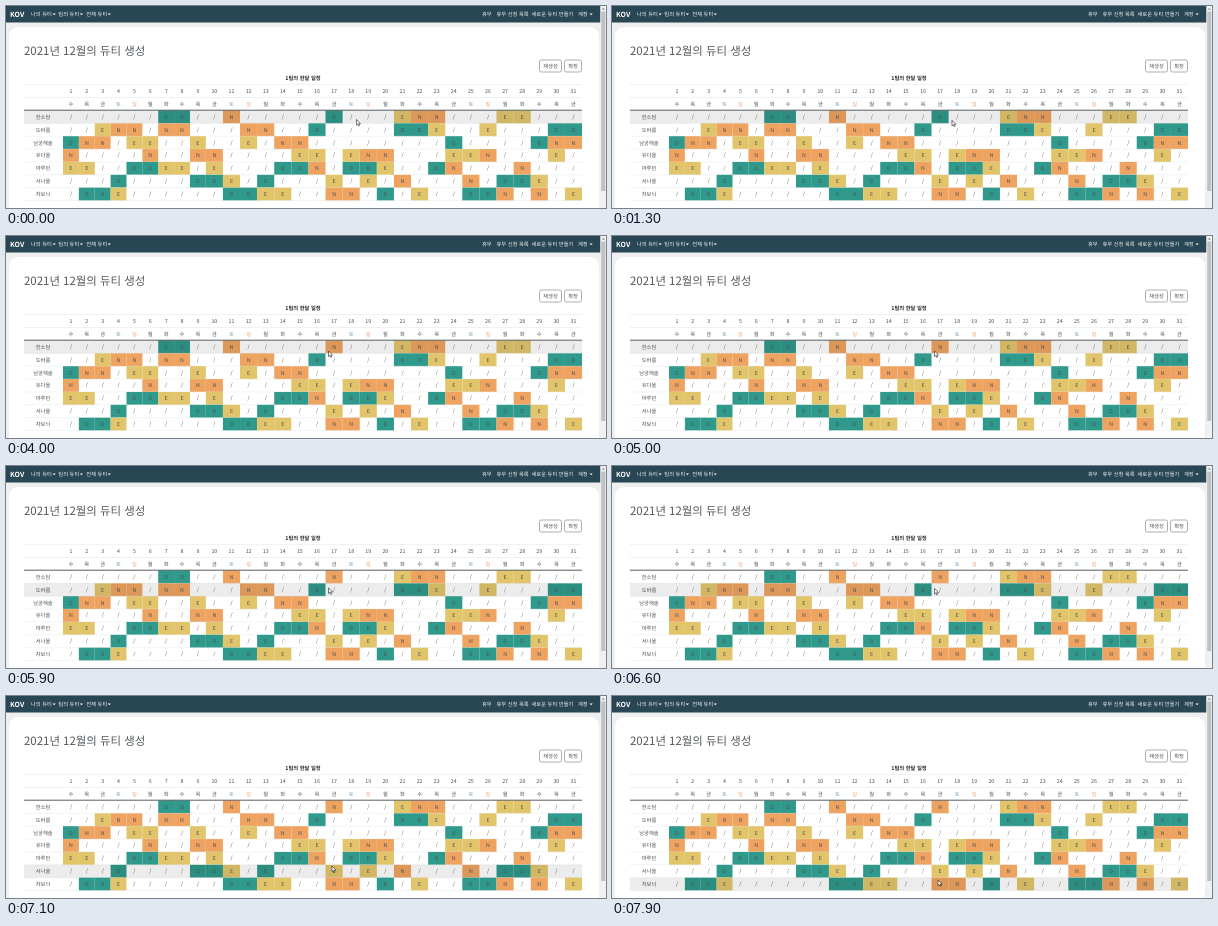
Write an HTML page that moves like this. It is 600x202 px and loops after 8000 ms.

```html
<!DOCTYPE html>
<html lang="ko">
<head>
<meta charset="utf-8">
<style>
html, body { margin: 0; width: 100%; height: 100%; overflow: hidden; background: #efefef; }
svg { display: block; width: 600px; height: 202px; }
text {
  font: 5.3px "Noto Sans CJK KR", "Noto Sans CJK", "Noto Sans", sans-serif;
  fill: #4c5155;
  text-rendering: geometricPrecision;
}
.nav { fill: #f4f6f7; }
.bold { font-weight: 700; fill: #212529; }
.brand { font-size: 7px; font-weight: 900; fill: #fff; }
.title { font-size: 11.45px; font-weight: 300; fill: #54595d; }
.sat { fill: #7da3bb; }
.sun { fill: #eaa173; }
</style>
</head>
<body>
<svg id="stage" viewBox="0 0 600 202"></svg>
<script>
const LOOP = 8000, STEP = 100;
const TOP = 104.5, ROW = 12.86, LEFT = 18, RIGHT = 576;
const COLORS = { D: '#2f998b', E: '#e2c56b', N: '#efa360', '/': 'none' };
const ROSTER = [
  ['한소담', '//////DD//N/////D///ENN///EE///'],
  ['도바름', '//ENN/NN///NN//D////DDE//E///DD'],
  ['남궁해솔', 'DNN/EE//E//E/NN////////D////DNN'],
  ['유다올', 'N////N//NN////EE/ENN///EEN///E/'],
  ['마루빈', 'EE//DDEE/E///DDN/DDE//DN///N///'],
  ['서나울', '///D////DDE/D///E/E/N///N/DDE//'],
  ['차보늬', '/DDE//////DDEE//NN/D/E//DDN/N/E']
];
const WEEK = '수목금토일월화';

// Edited shift: time and new value
const EDITS = [[0, 'D'], [2800, 'E'], [3400, 'N']];
// Pointer tip: time, x, y
const PATH = [
  [0, 350.5, 113.5], [1000, 350.5, 113.5], [1800, 322.5, 115.5], [2600, 322, 116],
  [4000, 322.5, 115], [5000, 322.5, 115], [5500, 322.5, 121.5], [6600, 322.5, 122.5],
  [6700, 323.2, 135], [6800, 324.5, 148.5], [7100, 326, 170], [7400, 326, 184], [8000, 326, 184]
];

const stage = document.getElementById('stage');

function add(tag, attrs, label) {
  const el = document.createElementNS('http://www.w3.org/2000/svg', tag);
  for (const key in attrs) el.setAttribute(key, attrs[key]);
  if (label) el.textContent = label;
  stage.appendChild(el);
  return el;
}
const box = (x, y, width, height, fill, more) => add('rect', { x, y, width, height, fill, ...more });
const rule = (y, stroke, width) =>
  add('path', { d: `M${LEFT} ${y}H${RIGHT}`, stroke, 'stroke-width': width });
const write = (x, y, label, cls = '', anchor = 'start') =>
  add('text', { x, y, class: cls, 'text-anchor': anchor }, label);
const centre = (x, y, label, cls) => write(x, y, label, cls, 'middle');
const caret = x => add('path', { d: `M${x} 7.4h3.2l-1.6 1.8z`, fill: '#f4f6f7' });
// One-digit days have narrower columns
const colX = day => 57 + 15.87 * Math.min(day - 1, 9) + 17.1 * Math.max(day - 10, 0);
const colMid = day => (colX(day) + colX(day + 1)) / 2;

function button(x, width, label) {
  box(x, 54, width, 12, '#fff', { rx: 1.8, stroke: '#737b82', 'stroke-width': 0.6 });
  centre(x + width / 2, 61.9, label);
}

function drawPage() {
  box(3, 21, 590, 200, '#fff', { rx: 9 });
  box(0, 0, 594.5, 16.5, '#284653');
  write(4, 10.5, 'KOV', 'brand');
  [[25, '나의 듀티', 46.6], [52.3, '팀의 듀티', 73.8], [80.3, '전체 듀티', 101.7]].forEach(([x, label, tip]) => {
    write(x, 9.9, label, 'nav');
    caret(tip);
  });
  write(476, 9.9, '휴무', 'nav');
  write(490.5, 9.9, '휴무 신청 목록', 'nav');
  write(525.5, 9.9, '새로운 듀티 만들기', 'nav');
  write(572, 9.9, '계정', 'nav');
  caret(583.5);

  box(594.5, 0, 5.5, 202, '#f1f1f1');
  box(595.2, 5.5, 4.1, 179.5, '#c1c1c1');
  add('path', { d: 'M595.8 3.6l1.5-1.7 1.5 1.7z', fill: '#777' });

  write(18, 48.6, '2021년 12월의 듀티 생성', 'title');
  button(533.5, 22, '재생성');
  button(558.5, 17, '확정');
  centre(297, 73.9, '1팀의 한달 일정', 'bold');
}

function drawTable() {
  rule(78.6, '#dee2e6', 0.5);
  rule(91.5, '#dee2e6', 0.5);
  for (let day = 1; day <= 31; day++) {
    const kind = (day - 1) % 7;
    centre(colMid(day), 87.2, String(day));
    centre(colMid(day), 99.9, WEEK[kind], kind === 3 ? 'sat' : kind === 4 ? 'sun' : '');
  }
  const edited = {};
  ROSTER.forEach(([name, shifts], r) => {
    const y = TOP + r * ROW;
    [...shifts].forEach((duty, i) => {
      const x = colX(i + 1);
      const cell = box(x, y, colX(i + 2) - x, ROW, COLORS[duty]);
      if (r === 0 && i === 16) edited.cell = cell;
    });
    rule(y + ROW, '#dee2e6', 0.4);
  });
  const hover = box(LEFT, TOP, RIGHT - LEFT, ROW, '#000', { 'fill-opacity': 0.075 });
  rule(104.2, '#30353a', 0.8);
  ROSTER.forEach(([name, shifts], r) => {
    const base = TOP + r * ROW + 8.3;
    centre(37, base, name);
    [...shifts].forEach((duty, i) => {
      const label = centre(colMid(i + 1), base, duty);
      if (r === 0 && i === 16) edited.label = label;
    });
  });
  return { hover, edited };
}

drawPage();
const { hover, edited } = drawTable();
const pointer = add('path', {
  d: 'M0 0V5.6L1.3 4.4 2.2 6.4 3.1 6 2.2 4.1H4Z',
  fill: '#fff', stroke: '#222', 'stroke-width': 0.6
});

function pointerAt(t) {
  const i = PATH.findIndex(p => p[0] > t);
  const [t0, x0, y0] = PATH[i - 1], [t1, x1, y1] = PATH[i];
  const k = (t - t0) / (t1 - t0);
  return [x0 + (x1 - x0) * k, y0 + (y1 - y0) * k];
}

function render(now) {
  const t = Math.floor((now % LOOP) / STEP) * STEP;
  const [x, y] = pointerAt(t);
  const row = Math.floor((y - TOP) / ROW);
  const duty = EDITS.filter(e => e[0] <= t).pop()[1];
  pointer.setAttribute('transform', `translate(${x} ${y})`);
  hover.setAttribute('y', TOP + row * ROW);
  edited.cell.setAttribute('fill', COLORS[duty]);
  if (edited.label.textContent !== duty) edited.label.textContent = duty;
}

const start = performance.now();
function tick() {
  render(performance.now() - start);
  requestAnimationFrame(tick);
}
tick();
</script>
</body>
</html>
```
